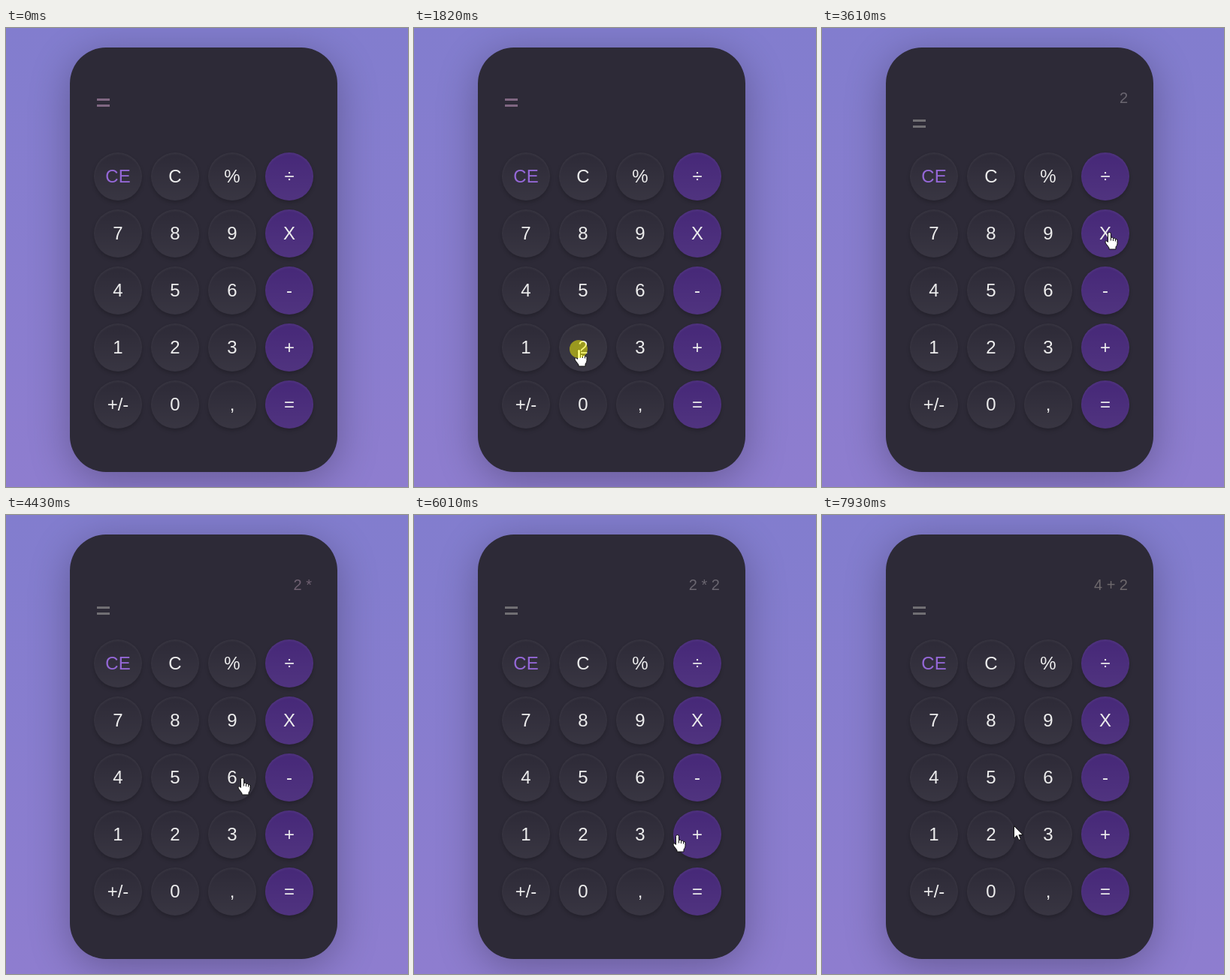
An HTML page with a canvas for the animation above (8000 ms loop, 535 by 612 pixels).

```html
<!DOCTYPE html>
<html lang="en">
<head>
<meta charset="utf-8">
<title>Calculator</title>
<style>
  html, body { margin: 0; width: 535px; height: 612px; overflow: hidden; }
  body {
    position: relative;
    background: linear-gradient(#827dce, #8e7dcf);
    font-family: "Liberation Sans", Arial, sans-serif;
  }
  #card {
    position: absolute; left: 85px; top: 26px; width: 356px; height: 566px;
    border-radius: 48px; background: #2d2a37;
    box-shadow: 0 11px 54px rgba(0, 0, 0, .28);
  }
  #entry {
    position: absolute; right: 128px; top: 82px;
    font-size: 20px; line-height: 23px; white-space: pre;
  }
  #equals {
    position: absolute; left: 121px; width: 17px; height: 5px;
    border: solid; border-width: 3px 0;
  }
  .key {
    position: absolute; width: 64px; height: 64px; border-radius: 50%;
    background: linear-gradient(rgba(255, 255, 255, 0), rgba(255, 255, 255, .055)) #2d2a37;
    box-shadow: inset 0 2px 3px rgba(255, 255, 255, .06), 0 3px 5px rgba(0, 0, 0, .2);
    color: #ededed; font-size: 24px; line-height: 64px; text-align: center;
  }
  .operator { background-color: #462878; }
  .clear { color: #9568d8; }
  canvas { position: absolute; left: 0; top: 0; }
</style>
</head>
<body>
<div id="card"></div>
<div id="entry"></div>
<div id="equals"></div>
<canvas id="overlay" width="535" height="612"></canvas>
<script>
const LOOP = 8000, STEP = 70, RADIUS = 32;
const entry = document.getElementById('entry');
const equals = document.getElementById('equals');
const overlay = document.getElementById('overlay');
const ctx = overlay.getContext('2d');

const keys = ['CE', 'C', '%', '÷', '7', '8', '9', 'X', '4', '5', '6', '-',
  '1', '2', '3', '+', '+/-', '0', ',', '='].map((label, i) => {
  const x = 149 + 76 * (i % 4), y = 198 + 76 * Math.floor(i / 4);
  const el = document.createElement('div');
  el.className = 'key' + (i % 4 === 3 ? ' operator' : i === 0 ? ' clear' : '');
  el.textContent = label;
  el.style.left = x - RADIUS + 'px';
  el.style.top = y - RADIUS + 'px';
  document.body.insertBefore(el, overlay);
  return { x, y };
});

// Pointer waypoints: time, x, y
const path = [
  [130, 491, 600], [900, 219, 431], [1030, 219, 429], [1360, 219, 428],
  [2340, 219, 428], [2970, 359, 415], [3190, 391, 334], [3610, 382, 272],
  [3940, 382, 272], [4430, 314, 350], [4780, 230, 421], [4850, 226, 421],
  [5450, 226, 421], [5520, 232, 421], [6140, 362, 427], [6290, 362, 427],
  [6570, 262, 428], [6850, 236, 423], [7720, 236, 423], [7930, 255, 414],
  [LOOP, 255, 414]
];
const moveStarts = [130, 1030, 1360, 1820, 2410, 3260, 3810, 4010, 4850, 5520, 6360, 7120, 7790];
const clicks = [[1820, 1950], [3810, 3870], [5050, 5120], [6210, 6360], [7120, 7190]];
const entries = [
  [0, '', '#806782'], [1890, '2', '#6a6670'], [3870, '2 *', '#6f6071'],
  [5120, '2 * 2', '#6a6670'], [6360, '4 +', '#6a6670'], [7190, '4 + 2', '#6d686c']
];

const lastBefore = (list, t, time) => list.filter(item => time(item) <= t).pop();

const slope = (i, axis) =>
  (path[i + 1][axis] - path[i][axis]) / (path[i + 1][0] - path[i][0]);

// Monotone tangents keep the pointer from overshooting its stops
function tangent(i, axis) {
  if (i === 0) return 1.5 * slope(0, axis);
  if (i === path.length - 1) return 0;
  const a = slope(i - 1, axis), b = slope(i, axis);
  return a * b > 0 ? 2 * a * b / (a + b) : 0;
}

function pointerAt(t) {
  let i = 0;
  while (i < path.length - 2 && path[i + 1][0] <= t) i++;
  const span = path[i + 1][0] - path[i][0], u = (t - path[i][0]) / span;
  const along = axis => {
    const a = path[i][axis], b = path[i + 1][axis];
    return a + (b - a) * u * u * (3 - 2 * u) +
      span * u * (1 - u) * (tangent(i, axis) * (1 - u) - tangent(i + 1, axis) * u);
  };
  return { x: Math.round(along(1)), y: Math.round(along(2)) };
}

const arrow = new Path2D('M0 0V16.5L3.8 13L6.4 19L9 17.9L6.5 12H11.8Z');
const hand = new Path2D('M-2 2Q-2 0 0 0Q2 0 2 2V7Q4.5 5.8 5 8Q7.5 6.8 8 9' +
  'Q10.5 8.3 10.5 11V15Q10.5 17 8.5 19.5V22.5H-.5V20.5L-5 14.5Q-6.3 12.2-4.8 11.3Q-3.4 10.7-2 13Z');
const creases = new Path2D('M2 7V11M5 8V11.5M8 9V12');

function disc(x, y, r, color) {
  ctx.fillStyle = color;
  ctx.beginPath();
  ctx.arc(x, y, r, 0, 2 * Math.PI);
  ctx.fill();
}

function drawPointer({ x, y }, overKey) {
  const shape = overKey ? hand : arrow;
  ctx.save();
  ctx.translate(x + .5, y + .5);
  ctx.lineJoin = 'round';
  ctx.fillStyle = '#fff';
  ctx.strokeStyle = '#111';
  ctx.lineWidth = 1;
  ctx.fill(shape);
  ctx.stroke(shape);
  if (overKey) ctx.stroke(creases);
  ctx.restore();
}

function render(t) {
  const [, text, color] = lastBefore(entries, t, e => e[0]);
  entry.textContent = text;
  entry.style.color = color;
  equals.style.top = (text ? 122 : 94) + 'px';
  equals.style.borderColor = text ? '#716f73' : color;

  ctx.clearRect(0, 0, overlay.width, overlay.height);
  const start = lastBefore(moveStarts, t, s => s);
  if (start === undefined) return;
  const tip = pointerAt(start + Math.floor((t - start) / STEP) * STEP);
  const key = keys.find(k => Math.hypot(k.x - tip.x, k.y - tip.y) <= RADIUS);
  const pressed = clicks.some(([from, to]) => t >= from && t < to);
  if (pressed && key) disc(key.x, key.y, RADIUS, 'rgba(255,255,255,.02)');
  drawPointer(tip, key);
  if (pressed) disc(tip.x, tip.y, 12, 'rgba(255,255,0,.5)');
}

const begin = performance.now();
function tick() {
  render((performance.now() - begin) % LOOP);
  requestAnimationFrame(tick);
}
tick();
</script>
</body>
</html>
```
